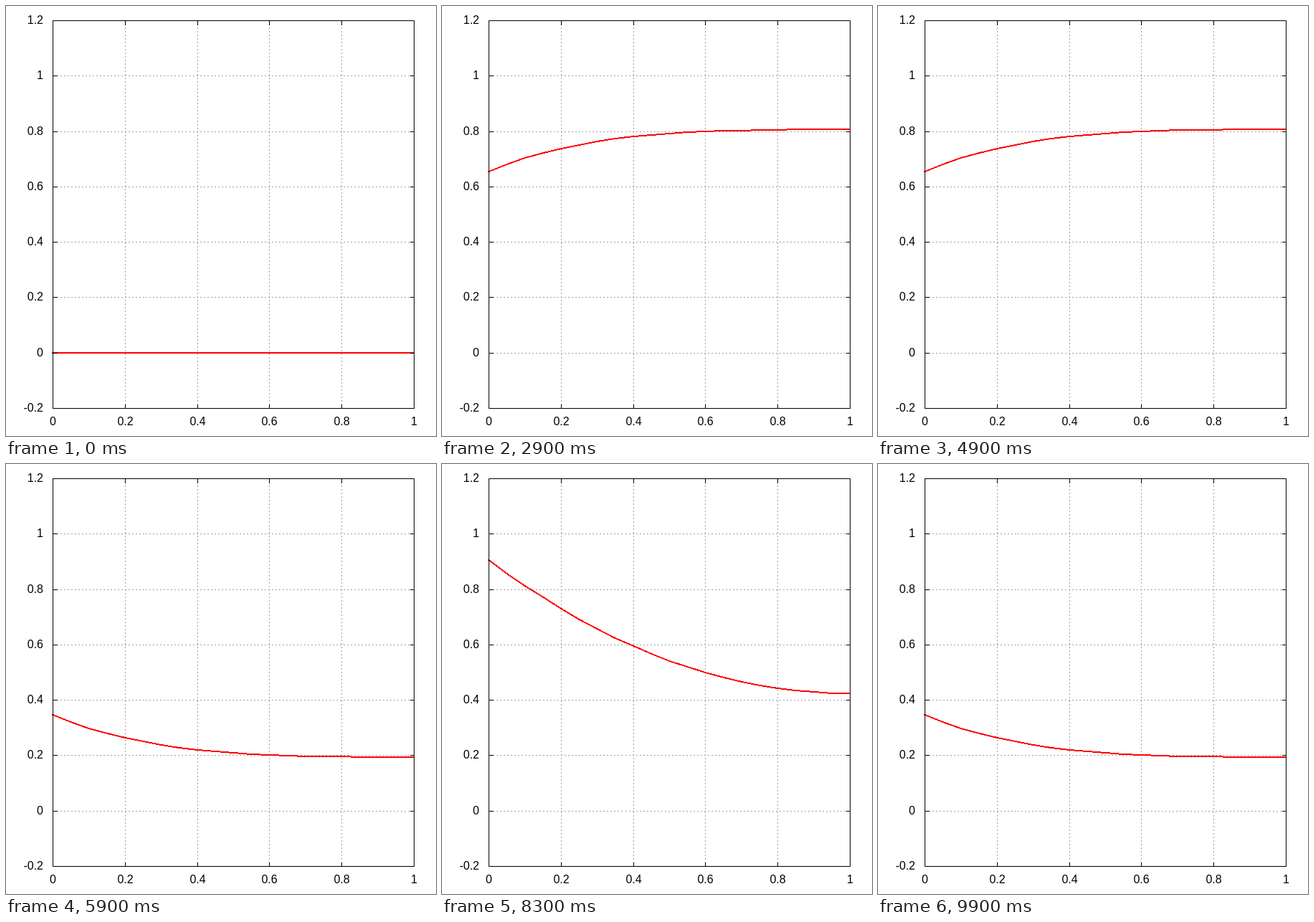
Write an HTML page that moves like this. It is 600 px wide and 600 px high and loops after 10000 ms.

```html
<!DOCTYPE html>
<html lang="en">
<head>
<meta charset="utf-8">
<title>Diffusion with an oscillating boundary</title>
<style>
  html, body { margin: 0; width: 100%; height: 100%; overflow: hidden; background: #fff; }
  svg { display: block; width: 600px; height: 600px; }
  path, polyline { fill: none; shape-rendering: crispEdges; }
  text { font: 16px "Liberation Sans", Arial, sans-serif; fill: #000; }
  .grid { stroke: #a0a0a0; stroke-dasharray: 2 3; }
  .axes { stroke: #000; }
  #curve { stroke: #f00; stroke-width: 2; stroke-linejoin: round; }
</style>
</head>
<body>
<svg viewBox="0 0 600 600">
  <g id="grid"></g>
  <polyline id="curve"/>
  <g id="axes"></g>
  <g id="labels"></g>
</svg>
<script>
const LEFT = 65, RIGHT = 569, TOP = 20, BOTTOM = 561;
const FRAME_MS = 100, FRAMES = 100, PERIOD = 20;
const CELLS = 20, MODES = 12;
const RATIO = 3.11; // angular frequency / diffusivity

const px = x => Math.round(LEFT + x * (RIGHT - LEFT));
const py = u => Math.round(BOTTOM - (u + 0.2) / 1.4 * (BOTTOM - TOP));
const byId = id => document.getElementById(id);

function add(parent, tag, attrs, text) {
  const el = document.createElementNS("http://www.w3.org/2000/svg", tag);
  for (const key in attrs) el.setAttribute(key, attrs[key]);
  if (text !== undefined) el.textContent = text;
  byId(parent).appendChild(el);
}

const line = (parent, d) => add(parent, "path", { d, class: parent });

function label(x, y, anchor, value) {
  add("labels", "text", { x, y, "text-anchor": anchor }, String(value));
}

function drawPlot() {
  const l = LEFT + 0.5, r = RIGHT + 0.5, t = TOP + 0.5, b = BOTTOM + 0.5;
  for (let i = 0; i <= 5; i++) {
    const x = px(i / 5) + 0.5;
    label(x, 585, "middle", i / 5);
    if (i === 0 || i === 5) continue;
    line("grid", `M${x} ${b}V${t}`);
    line("axes", `M${x} ${b}v-6M${x} ${t}v6`);
  }
  for (let i = -1; i <= 6; i++) {
    const y = py(i / 5) + 0.5;
    label(52, y + 4.5, "end", i / 5);
    if (i === -1 || i === 6) continue;
    line("grid", `M${l} ${y}H${r}`);
    line("axes", `M${l} ${y}h6M${r} ${y}h-6`);
  }
  line("axes", `M${l} ${t}H${r}V${b}H${l}Z`);
}

// cosh(s(1 + i)) as magnitude and phase
function cosh(s) {
  const re = Math.cosh(s) * Math.cos(s), im = Math.sinh(s) * Math.sin(s);
  return { mag: Math.hypot(re, im), arg: Math.atan2(im, re) };
}

// Heat equation: u(0) = (1 + sin phase) / 2, no flux at x = 1, initially zero
function heat(x, phase) {
  if (phase === 0) return 0;
  const s = Math.sqrt(RATIO / 2);
  const here = cosh(s * (1 - x)), base = cosh(s);
  let u = 0.5 + 0.5 * here.mag / base.mag * Math.sin(phase + here.arg - base.arg);
  for (let m = 0; m < MODES; m++) {
    const k = (m + 0.5) * Math.PI;
    const c = k * RATIO / (k ** 4 + RATIO ** 2) - 1 / k;
    u += c * Math.sin(k * x) * Math.exp(-k * k * phase / RATIO);
  }
  return u;
}

function drawCurve(step) {
  const phase = 2 * Math.PI * step / PERIOD;
  const points = [`64,${py(heat(0, phase))}`];
  for (let i = 0; i <= CELLS; i++) {
    const x = i / CELLS;
    points.push(`${px(x) + 0.5},${py(heat(x, phase))}`);
  }
  byId("curve").setAttribute("points", points.join(" "));
}

const start = performance.now();
let shown = -1;

function tick() {
  const step = Math.floor((performance.now() - start) / FRAME_MS) % FRAMES;
  if (step !== shown) drawCurve(shown = step);
  requestAnimationFrame(tick);
}

drawPlot();
tick();
</script>
</body>
</html>
```
